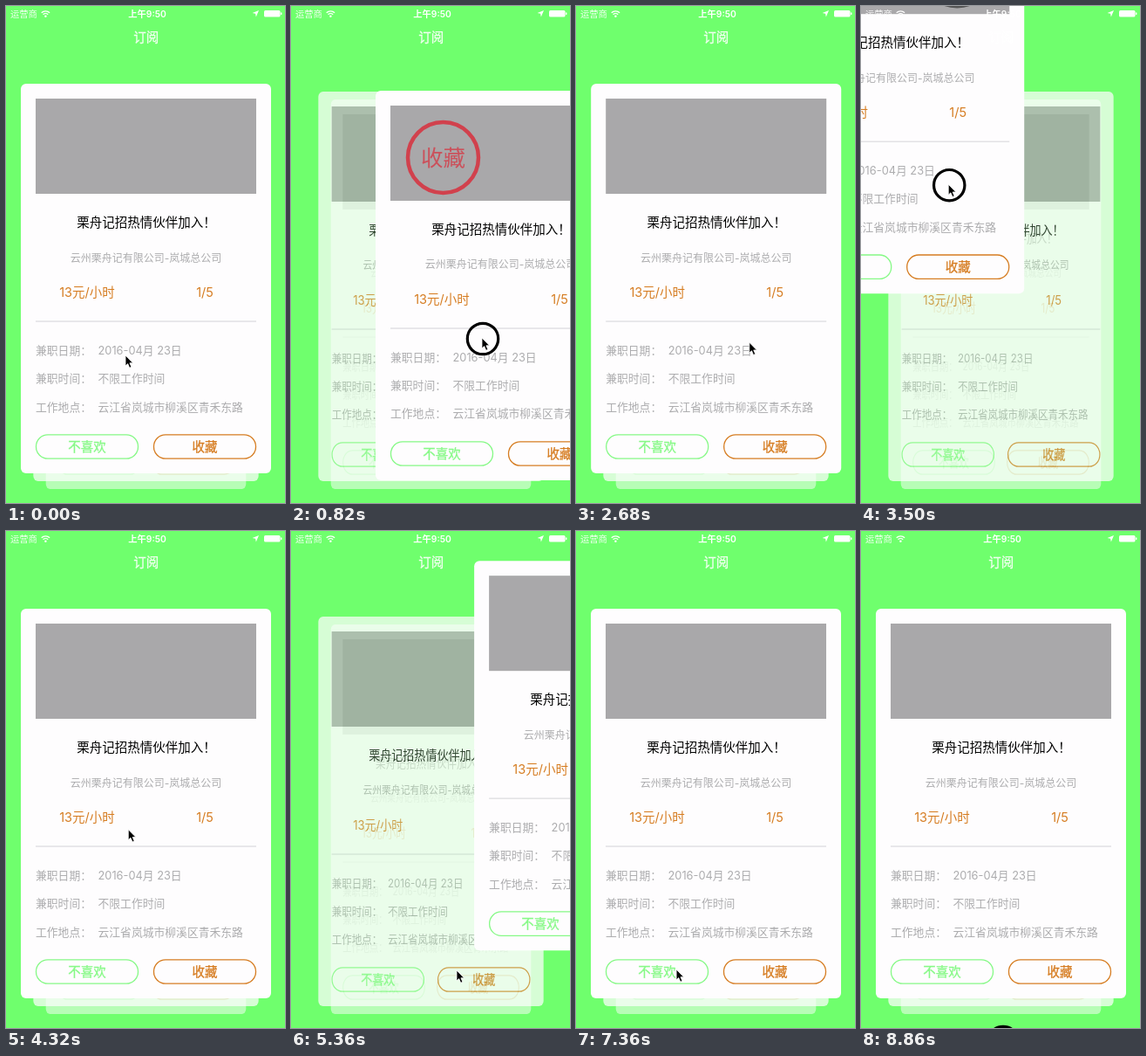
An HTML page for the animation above (8900 ms loop, 320 by 569 pixels).

```html
<!DOCTYPE html>
<html lang="zh-CN">
<head>
<meta charset="utf-8">
<style>
html, body { margin: 0; width: 100%; height: 100%; overflow: hidden; background: #6fff6d; }
svg { display: block; width: 100%; height: 100%; font: 12.8px Inter, "Noto Sans CJK SC", "Noto Sans CJK", sans-serif; }
.mid { text-anchor: middle; }
.big { font-size: 14.5px; }
.stamp { font-size: 25.5px; font-weight: 300; }
.bar { fill: #fff; font-size: 10.3px; }
.line { fill: none; stroke-width: 1.3; }
.semi { stroke-width: .3; }
</style>
</head>
<body>
<svg viewBox="0 0 320 569">
  <defs>
    <g id="face">
      <rect x="17" y="89" width="287" height="446" rx="6" fill="#fefdfe"/>
      <rect x="34" y="106" width="253" height="109" fill="#a9a8aa"/>
      <text class="mid big" x="161" y="253">栗舟记招热情伙伴加入！</text>
      <g fill="#acacae">
        <text class="mid" x="160.5" y="292.5" font-size="12">云州栗舟记有限公司-岚城总公司</text>
        <text x="34" y="398.6">兼职日期：</text><text x="105.5" y="398.6">2016-04月 23日</text>
        <text x="34" y="431">兼职时间：</text><text x="105.5" y="431">不限工作时间</text>
        <text x="34" y="463.5">工作地点：</text><text x="105.5" y="463.5">云江省岚城市柳溪区青禾东路</text>
      </g>
      <rect x="34" y="360.3" width="253" height="1.5" fill="#e2e2e5"/>
      <g class="mid big" fill="#d67d22">
        <text x="93" y="332.8">13元/小时</text>
        <text x="228" y="332.8">1/5</text>
        <text class="semi" x="228" y="509.6" stroke="#d67d22">收藏</text>
        <text class="semi" x="93" y="509.6" fill="#86f986" stroke="#86f986">不喜欢</text>
      </g>
      <rect class="line" x="34.5" y="490.8" width="117" height="27.4" rx="13.5" stroke="#86f986"/>
      <rect class="line" x="169.5" y="490.8" width="117" height="27.4" rx="13.5" stroke="#d67d22"/>
    </g>
  </defs>
  <rect width="320" height="569" fill="#6fff6d"/>
  <use href="#face" transform="translate(32.1 18) scale(.8 1)" opacity=".5"/>
  <use href="#face" transform="translate(16.05 9) scale(.9 1)" opacity=".72"/>
  <g id="card">
    <use href="#face"/>
    <g id="like" class="mid stamp" fill="#dc2837">
      <circle cx="94.5" cy="165.5" r="40.5" fill="none" stroke="#dc2837" stroke-width="4.5"/>
      <text x="94.5" y="175" opacity=".85">收藏</text>
    </g>
    <g id="nope" class="mid stamp" fill="#555">
      <circle cx="227" cy="165.5" r="40.5" fill="none" stroke="#555" stroke-width="4.5"/>
      <text x="227.5" y="175" opacity=".85">不喜欢</text>
    </g>
  </g>
  <g class="bar">
    <text x="5" y="13" opacity=".9">运营商</text>
    <path class="line" stroke="#fff" d="M40.7 7.8a6.6 6.6 0 0 1 9.4 0M42.6 9.8a4 4 0 0 1 5.6 0"/>
    <circle cx="45.4" cy="11.7" r="1.2"/>
    <text class="mid" x="162" y="13" font-weight="600">上午9:50</text>
    <path d="M290 5l-3.2 7.5-.7-3.7-3.5-.7z"/>
    <rect x="296" y="5" width="18.5" height="7.5" rx="1.5"/>
    <rect x="315" y="7.2" width="1.4" height="3" rx=".7"/>
    <text class="mid big semi" x="160.8" y="41" stroke="#fff" opacity=".9">订阅</text>
  </g>
  <g id="cursor">
    <circle id="ring" cx="1" cy="1" r="17.7" fill="none" stroke="#000" stroke-width="3.2"/>
    <path d="M0 0v12l2.7-2.4 2 4.7 2.2-1-2-4.5h3.7z" stroke="#fff" stroke-width=".8"/>
  </g>
</svg>
<script>
const LOOP = 8900;
const $ = id => document.getElementById(id);
const ease = p => (1 - Math.cos(Math.PI * p)) / 2;

// What the hand does. A pull swings the card out over `reach` ms (and back if held longer);
// on release it springs home, or flies off when a `next` card follows at that time.
const acts = [
  { start: 0, end: 0, grab: [137, 400] },
  { start: 130, end: 1050, grab: [139, 372], reach: 690, pull: [80, 8], sway: [25, -80] },
  { start: 1800, end: 2550, grab: [200, 381], reach: 400, pull: [-122, -16] },
  { start: 3050, end: 3560, grab: [217, 410], reach: 520, pull: [-122, -215], next: 3780 },
  { start: 5130, end: 5215, grab: [190, 503] },
  { start: 5215, end: 5475, grab: [190, 503], reach: 260, pull: [324, -92], next: 5500, auto: true },
  { start: 6280, end: 6780, grab: [193, 386], reach: 500, pull: [-167, 216], next: 7300 },
  { start: 8180, end: 8180, grab: [268, 330] },
  { start: 8270, end: 8270, grab: [120, 600] },
  { start: 8850, end: LOOP, grab: [162, 584] }
];

function offset(act, t) {
  if (!act || !act.pull || t >= act.next) return [0, 0];
  const p = (Math.min(t, act.end) - act.start) / act.reach;
  const s = Math.max(0, t - act.end) / 1000;
  const after = act.next ? 1 + 10 * s : Math.exp(-9 * s) * Math.cos(13 * s);
  const sway = act.sway || [0, 0];
  return act.pull.map((d, i) => (d * ease(p) + sway[i] * ease(2 * p)) * after);
}

function hand(act, t) {
  const move = act.auto ? [0, 0] : offset(act, t);
  return act.grab.map((g, i) => g + move[i]);
}

function pointer(t) {
  const i = acts.findLastIndex(a => a.start <= t);
  const act = acts[i], next = acts[i + 1];
  if (t < act.end || !next) return hand(act, t);
  const from = hand(act, act.end);
  const u = ease((t - act.end) / (next.start - act.end));
  return from.map((v, c) => v + (next.grab[c] - v) * u);
}

const move = (id, [x, y]) => $(id).setAttribute("transform", `translate(${x} ${y})`);
const fade = (id, a) => $(id).setAttribute("opacity", Math.max(0, Math.min(1, a)));

function draw(t) {
  const act = acts.findLast(a => a.pull && a.start <= t);
  const pos = offset(act, t);
  const tint = act && act.auto ? 0 : pos[0] / 100;
  move("card", pos);
  fade("like", tint);
  fade("nope", -tint);
  move("cursor", pointer(t));
  fade("ring", acts.some(a => !a.auto && t >= a.start && t < a.end) ? 1 : 0);
}

const start = performance.now();
function tick() {
  draw((performance.now() - start) % LOOP);
  requestAnimationFrame(tick);
}
tick();
</script>
</body>
</html>
```
